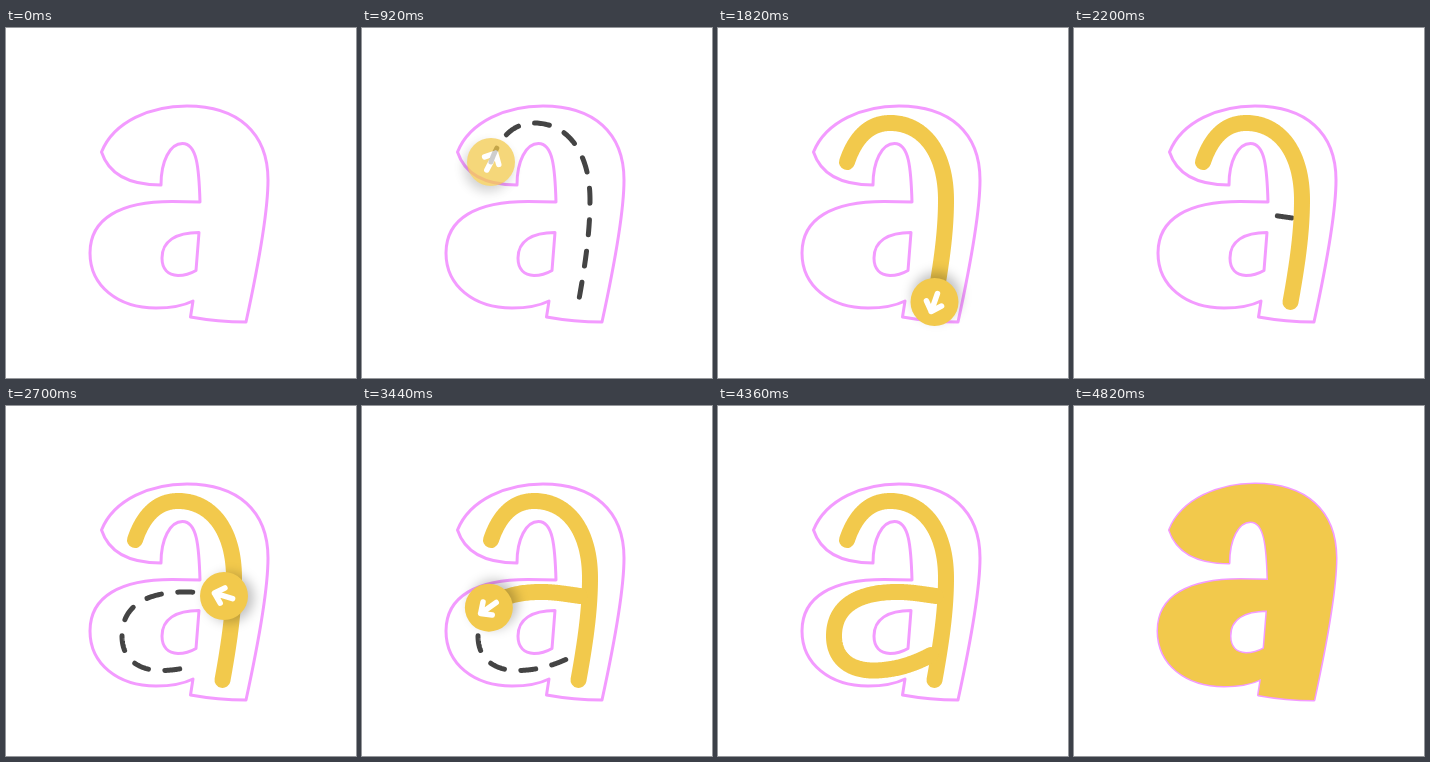
These frames come from a looping animation (350x350 px, 6 s). An HTML page with a canvas:

```html
<!DOCTYPE html>
<html lang="en">
<head>
<meta charset="utf-8">
<title>Tracing the letter a</title>
<style>
  html, body { margin: 0; width: 100%; height: 100%; overflow: hidden; background: #fff; }
  canvas { position: absolute; left: 0; top: 0; width: 350px; height: 350px; }
</style>
</head>
<body>
<canvas id="page"></canvas>
<canvas id="badge"></canvas>
<script>
const SIZE = 350, LOOP = 6000;
const GOLD = '#f2c94c', PINK = '#f39bff', DARK = '#444';
const scale = window.devicePixelRatio || 1;

const letter = new Path2D(
  'M95.5 124C108 93 145 78 181 78C232 78 262 105 262 152C262 185 250 248 240 294' +
  'Q212 294 184.5 289L187 273C175 279 162 280 150 280C112 280 84 258 84 225' +
  'C84 190 115 173.5 166 173.5L194 174C193 140 191 115.5 176.5 115.5' +
  'C164 115.5 155 133 155 157C125 157 103 147 95.5 124Z' +
  'M193 204.5L190 242.5C184 246 178 247.5 172 247.5C162 247 156 241 156 230' +
  'C156 213 170 204.5 193 204.5Z');

// Each pair is [start, end] in ms.
const strokes = [
  {
    path: trace([129, 134, 137, 110, 151, 95, 172, 95, 206, 95, 228, 125, 228, 172,
      228, 205, 223, 238, 216.5, 274]),
    dash: [80, 780], show: [770, 1000], move: [1095, 1820], hide: [1825, 1985]
  },
  {
    path: trace([218, 190, 204, 188, 190, 185.5, 175, 186, 140, 187, 116, 200, 116, 230,
      116, 255, 135, 265, 157, 264.5, 178, 264, 196, 258, 213, 249]),
    dash: [2070, 2900], show: [2330, 2560], move: [3080, 3925], hide: [4210, 4365]
  }
];
const FILL = [4570, 4820];

const page = setup('page');
const badge = setup('badge');

function setup(id) {
  const canvas = document.getElementById(id);
  canvas.width = canvas.height = Math.round(SIZE * scale);
  const ctx = canvas.getContext('2d');
  ctx.scale(scale, scale);
  ctx.lineCap = ctx.lineJoin = 'round';
  return ctx;
}

// Samples a chain of cubic curves into points with their arc length.
function trace(c) {
  const pts = [{ x: c[0], y: c[1], s: 0 }];
  for (let i = 0; i + 7 < c.length; i += 6) {
    for (let n = 1; n <= 60; n++) {
      const t = n / 60, u = 1 - t;
      const at = k => u * u * u * c[k] + 3 * u * u * t * c[k + 2] +
        3 * u * t * t * c[k + 4] + t * t * t * c[k + 6];
      const last = pts[pts.length - 1], x = at(i), y = at(i + 1);
      pts.push({ x, y, s: last.s + Math.hypot(x - last.x, y - last.y) });
    }
  }
  return pts;
}

function pointAt(pts, p) {
  const s = p * pts[pts.length - 1].s;
  let i = 1;
  while (i < pts.length - 1 && pts[i].s < s) i++;
  const a = pts[i - 1], b = pts[i], f = (s - a.s) / (b.s - a.s);
  return {
    x: a.x + (b.x - a.x) * f,
    y: a.y + (b.y - a.y) * f,
    angle: Math.atan2(b.y - a.y, b.x - a.x),
    s
  };
}

function progress(t, [from, to]) {
  return Math.min(1, Math.max(0, (t - from) / (to - from)));
}

function ease(t, span) {
  return (1 - Math.cos(Math.PI * progress(t, span))) / 2;
}

function drawPart(pts, p, width, color, dash) {
  if (p <= 0) return;
  const end = pointAt(pts, p);
  page.beginPath();
  for (const q of pts) {
    if (q.s >= end.s) break;
    page.lineTo(q.x, q.y);
  }
  page.lineTo(end.x, end.y);
  page.setLineDash(dash);
  page.lineWidth = width;
  page.strokeStyle = color;
  page.stroke();
  page.setLineDash([]);
}

function drawBadge({ x, y, angle }) {
  const dir = angle + Math.PI / 20;
  badge.save();
  badge.shadowColor = 'rgba(0,0,0,.25)';
  badge.shadowBlur = 12 * scale;
  badge.shadowOffsetX = -6 * Math.cos(dir) * scale;
  badge.shadowOffsetY = -6 * Math.sin(dir) * scale;
  badge.fillStyle = GOLD;
  badge.beginPath();
  badge.arc(x, y, 24, 0, 2 * Math.PI);
  badge.fill();
  badge.restore();

  badge.save();
  badge.translate(x, y);
  badge.rotate(dir);
  badge.strokeStyle = '#fff';
  badge.lineWidth = 5.5;
  badge.beginPath();
  badge.moveTo(-9, 0);
  badge.lineTo(10, 0);
  badge.moveTo(1.5, -8);
  badge.lineTo(10, 0);
  badge.lineTo(1.5, 8);
  badge.stroke();
  badge.restore();
}

function draw(t) {
  page.fillStyle = '#fff';
  page.fillRect(0, 0, SIZE, SIZE);
  badge.clearRect(0, 0, SIZE, SIZE);

  page.lineWidth = 3;
  page.strokeStyle = PINK;
  page.stroke(letter);

  for (const k of strokes) drawPart(k.path, ease(t, k.dash), 5, DARK, [15, 16.5]);

  let opacity = 0;
  for (const k of strokes) {
    const p = ease(t, k.move);
    drawPart(k.path, p, 16, GOLD, []);
    const alpha = ease(t, k.show) - ease(t, k.hide);
    if (alpha > 0) {
      opacity = alpha;
      drawBadge(pointAt(k.path, p));
    }
  }
  badge.canvas.style.opacity = opacity;

  page.globalAlpha = progress(t, FILL);
  page.fillStyle = GOLD;
  page.fill(letter, 'evenodd');
  page.globalAlpha = 1;
}

const begin = performance.now();
function tick() {
  draw((performance.now() - begin) % LOOP);
  requestAnimationFrame(tick);
}
tick();
</script>
</body>
</html>
```
